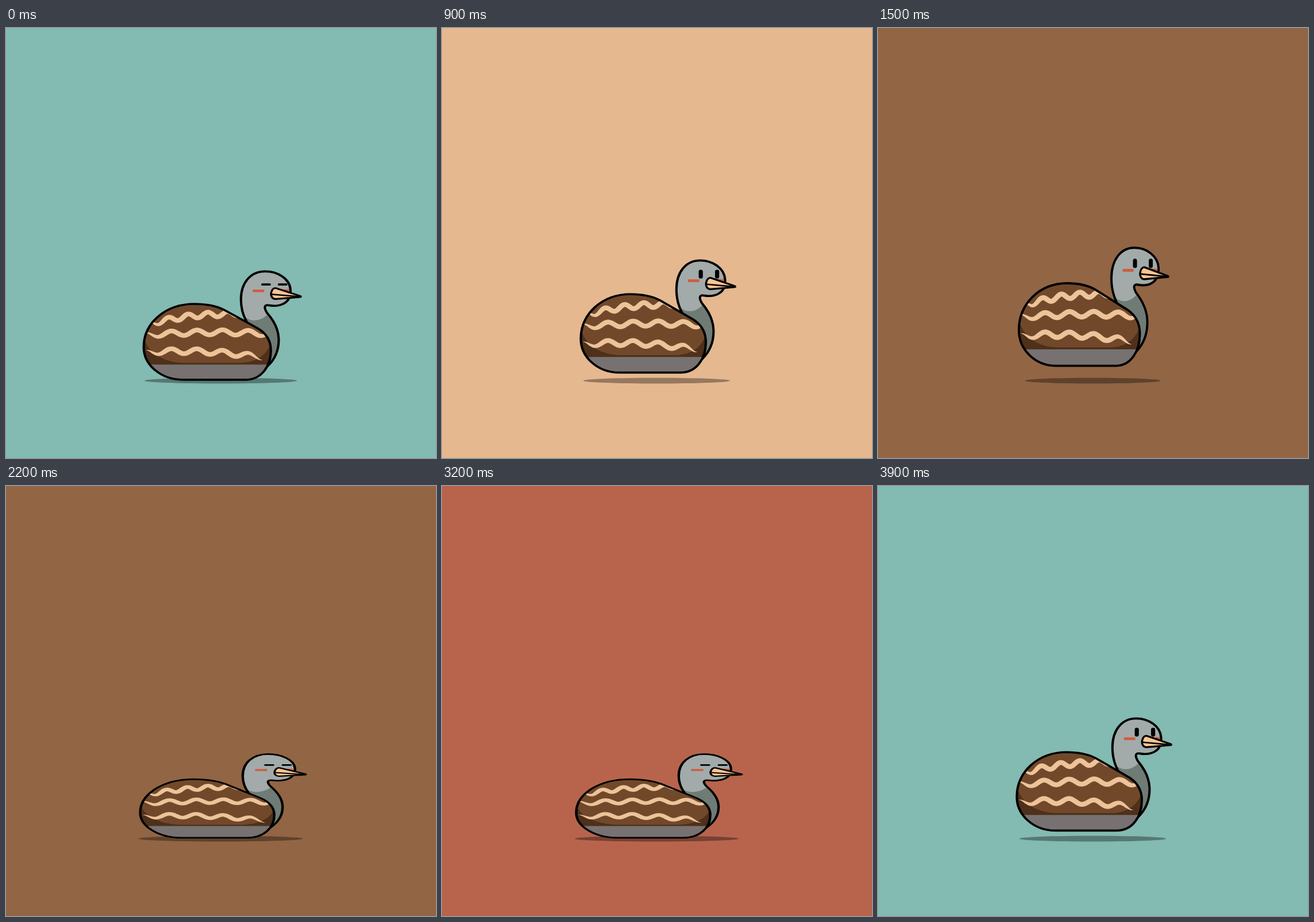
An HTML page that plays this animation: 748 px wide and 748 px high, repeating every 4 s.

```html
<!DOCTYPE html>
<html lang="en">
<head>
<meta charset="utf-8">
<title>Bouncing bird</title>
<style>
  html, body { margin: 0; width: 100%; height: 100%; overflow: hidden; background: #83bab1; }
  svg { display: block; width: 100vw; height: 100vh; }
  .line { fill: none; stroke: #000; stroke-width: 3.9; stroke-linejoin: round; stroke-linecap: round; }
  .line.eye { stroke-width: 7; }
  .line.lid { stroke-width: 4; }
  .line.beak { fill: #fbc594; stroke-width: 3.3; }
  .line.mouth { stroke-width: 2.8; }
  .blush { stroke: #d25b3f; stroke-width: 5; }
</style>
</head>
<body>
<svg viewBox="0 0 748 748">
  <defs>
    <path id="torso" d="M310 587.5C274 587.5 245 560 245 526C245 480 281 444.500 329 444.500C347 444.500 363 447 378 455.500L434 490.500C448 500 455.500 514 455.500 532C455.500 562 440 587.500 413 587.500Z"/>
    <path id="neck" d="M450 562C463 548 469 530 468.500 510C468 492 460 475 449 461C444 452 444 445.500 452 447C460 448.500 470 448.500 478 443C487 437 488.500 428 488 418C487 397 467 383 446 383C422 383 406 404 406 436C406 458 412 476 424 492L440 540Z"/>
    <clipPath id="inTorso"><use href="#torso"/></clipPath>
    <clipPath id="inNeck"><use href="#neck"/></clipPath>
  </defs>

  <rect id="back" width="748" height="748"/>
  <ellipse id="shadow" cx="373.5" cy="613.5" ry="5" opacity=".35"/>

  <g id="bird">
    <g clip-path="url(#inNeck)">
      <use href="#neck" fill="#a2abaa"/>
      <path d="M404 458C416 481 438 480 451 463L480 466V580H404Z" fill="#6f7c75"/>
    </g>
    <use href="#neck" class="line"/>

    <g id="face">
      <path class="blush" d="M425.500 422H444.500M472 421.500H485.500"/>
      <path id="open" class="line eye" d="M447 405.500V414.500M474.500 405.500V414.500"/>
      <path id="shut" class="line lid" d="M441.500 410H453.500M469 410H481"/>
      <path class="line beak" d="M464 417L504.500 432Q506 433.500 504 433.700L463 437.500C458 437 455 432 456 426C457 420 460 416 464 417Z"/>
      <path class="line mouth" d="M457 428.500L503 433"/>
    </g>

    <g clip-path="url(#inTorso)">
      <use href="#torso" fill="#4e301b"/>
      <path d="M244 503C250 535 275 555 312 555.500H405C432 555 450 540 456 516V430H244Z" fill="#71492a"/>
      <path d="M240 559H460V595H240Z" fill="#777271"/>
      <g id="waves" fill="#edc39a"></g>
    </g>
    <use href="#torso" class="line"/>
  </g>
</svg>

<script>
const $ = id => document.getElementById(id);
const TAU = 2 * Math.PI;

// A tapered sine ribbon that follows a shallow parabola
function ribbon({ from, to, crest, pitch, low, mid, bend }) {
  const top = [], bottom = [];
  for (let x = from; x <= to; x += 2) {
    const angle = TAU * (x - crest) / pitch;
    const y = low + bend * (x - mid) ** 2 - 4.8 * Math.cos(angle);
    const slope = 2 * bend * (x - mid) + 4.8 * TAU / pitch * Math.sin(angle);
    const taper = Math.min(1, (x - from) / 40, (to - x) / 40);
    const half = 4.4 * Math.sin(taper * TAU / 4) / Math.hypot(1, slope);
    top.push([x + slope * half, y - half]);
    bottom.unshift([x - slope * half, y + half]);
  }
  const points = [...top, ...bottom].map(p => p.map(v => v.toFixed(2)));
  return `<path d="M${points.join('L')}Z"/>`;
}

$('waves').innerHTML = [
  { from: 250, to: 410, crest: 286, pitch: 32.5, low: 464, mid: 375, bend: .0013 },
  { from: 245, to: 465, crest: 290.5, pitch: 42.5, low: 498, mid: 365, bend: .0004 },
  { from: 248, to: 442, crest: 290.5, pitch: 42.5, low: 533.5, mid: 310, bend: .0007 }
].map(ribbon).join('');

const colors = ['#83bab1', '#e6b890', '#926544', '#b8644d'];
const STEP = 100, BOUNCE = 1000, LOOP = 4000;

function draw(now) {
  const t = Math.floor(now / STEP) * STEP % LOOP;
  const phase = t % BOUNCE / BOUNCE;
  const swing = Math.cos(TAU * (phase - .6));
  const squash = Math.exp(-(((phase - .2) / .113) ** 2));
  const rise = Math.max(0, 28.4 - 227 * (phase - .635) ** 2);
  const wide = 1.024 - .0295 * swing + .06 * squash;
  const tall = .968 + .045 * swing - .22 * squash;
  const lag = Math.max(0, 2.3 * Math.cos(TAU * (phase + .03)));
  const blink = phase < .35 || phase > .95;

  $('back').setAttribute('fill', colors[Math.floor((t + BOUNCE / 2) / BOUNCE) % colors.length]);
  $('shadow').setAttribute('rx', 125 - 9 * swing + 10.5 * squash);
  $('bird').setAttribute('transform',
    `translate(352 ${611.9 - rise}) scale(${wide} ${tall}) translate(-352 -587.5)`);
  $('face').setAttribute('transform', `translate(0 ${-lag})`);
  $('open').style.display = blink ? 'none' : '';
  $('shut').style.display = blink ? '' : 'none';
}

function tick() {
  draw(performance.now());
  requestAnimationFrame(tick);
}
tick();
</script>
</body>
</html>
```
